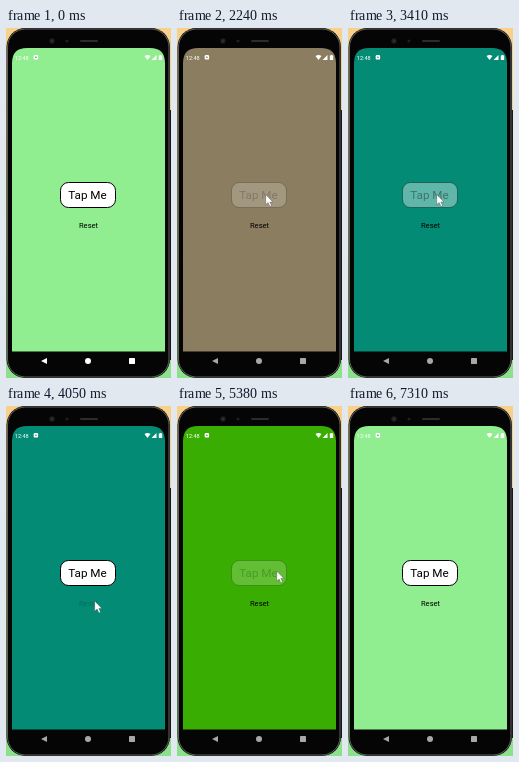
An HTML page that plays this animation: 165 px wide and 350 px high, repeating every 7.63 s.

```html
<!DOCTYPE html>
<html lang="en">
<head>
<meta charset="utf-8">
<title>Tap Me</title>
<style>
  html, body { margin: 0; width: 100%; height: 100%; overflow: hidden; }
  svg { display: block; width: 100vw; height: 100vh; }
  text { font-family: Roboto, sans-serif; }
</style>
</head>
<body>
<svg viewBox="0 0 165 350">
  <defs>
    <linearGradient id="desk" x2="0" y2="1">
      <stop offset="0" stop-color="#f8d08a"/>
      <stop offset=".5" stop-color="#d8d896"/>
      <stop offset="1" stop-color="#8be08b"/>
    </linearGradient>
  </defs>
  <rect width="165" height="350" fill="url(#desk)"/>

  <!-- phone -->
  <rect x="162" y="82" width="3" height="250" fill="#1a1614"/>
  <rect x=".5" y="0" width="163.500" height="350" rx="19" fill="#050505"/>
  <rect x="1.500" y="1" width="161.500" height="348" rx="18" fill="none" stroke="#6c6e6c" stroke-width=".9"/>
  <rect x="74" y="12" width="18" height="2" rx="1" fill="#2c2c2c"/>
  <circle cx="46" cy="13" r="2.7" fill="#1d1f22"/>
  <circle cx="46" cy="13" r="1" fill="#30343a"/>
  <circle cx="61" cy="13" r="1.6" fill="#1d1f22"/>
  <path id="screen" d="M6 323.500V35Q6 20 21 20H144Q159 20 159 35V323.500Z"/>

  <!-- status bar -->
  <g fill="#fff">
    <text x="8.8" y="31.6" font-size="5.6">12:48</text>
    <rect x="27.7" y="27" width="4.4" height="4.6" rx="1.2"/>
    <path d="M138.500 28Q141.500 26 144.500 28L141.500 32ZM150.500 27V32H145.500ZM152.800 27.600H153.700V27H155.300V27.600H156.200V32H152.800Z"/>
  </g>
  <circle cx="29.9" cy="29.3" r=".8" fill="#666"/>

  <!-- app -->
  <g id="tap">
    <rect x="54.500" y="154.500" width="55" height="25" rx="8" fill="#fff" stroke="#000"/>
    <text x="81.500" y="171.200" font-size="11.700" text-anchor="middle">Tap Me</text>
  </g>
  <text id="reset" x="82.500" y="199.700" font-size="7.600" text-anchor="middle">Reset</text>

  <!-- navigation bar -->
  <g id="nav">
    <path d="M41 330V336L35 333Z"/>
    <circle cx="82" cy="333" r="3"/>
    <rect x="123" y="330" width="6" height="6" rx=".4"/>
  </g>

  <path id="cursor" d="M0 0V10.200L2.400 8L4.200 12L5.900 11.200L4.200 7.400H7.200Z"
        fill="#fff" stroke="#333" stroke-width=".35"/>
</svg>

<script>
const LOOP = 7630;
const HOME = '#90ee90';
const el = id => document.getElementById(id);

// [press, release, button, background after release]
const presses = [
  [1450, 1580, 'tap', '#5a88a0'],
  [2140, 2240, 'tap', '#8b7d5f'],
  [2700, 2870, 'tap', '#97388f'],
  [3250, 3330, 'tap', '#038b76'],
  [3950, 4120, 'reset', HOME],
  [4810, 4890, 'tap', '#b0883c'],
  [5240, 5380, 'tap', '#3aad02'],
  [5610, 5690, 'tap', '#4dd5ff'],
  [6240, 6370, 'reset', HOME]
];

// [start, end, x, y]: the pointer reaches x, y at the end
const moves = [
  [440, 440, 118, 323],
  [440, 1150, 88.7, 166.5],
  [3600, 3810, 88.7, 195],
  [4380, 4680, 99.7, 165],
  [5960, 6220, 91.7, 200],
  [6460, 7150, 138, 319],
  [7150, 7230, 138, 339]
];

const ease = p => {
  p = Math.min(1, Math.max(0, p));
  return p < .5 ? 2 * p * p : 1 - 2 * (1 - p) ** 2;
};

function opacity(button, t) {
  const last = presses.filter(([down, , name]) => name === button && t >= down).pop();
  if (!last) return 1;
  const [down, up] = last;
  return t < up ? 1 - .8 * ease((t - down) / 100) : .2 + .8 * ease((t - up) / 250);
}

// Face, border and label fade separately, each over the one below
function fade(button, t) {
  const alpha = opacity(button, t);
  el(button).setAttribute('fill-opacity', alpha);
  el(button).setAttribute('stroke-opacity', alpha);
}

function pointer(t) {
  let x = 0, y = 0;
  for (const [start, end, toX, toY] of moves) {
    if (t < start) break;
    const p = end > start ? ease((t - start) / (end - start)) : 1;
    x += (toX - x) * p;
    y += (toY - y) * p;
  }
  return `translate(${x} ${y})`;
}

function draw(t) {
  const released = presses.filter(([, up]) => t >= up).pop();
  el('screen').setAttribute('fill', released ? released[3] : HOME);
  fade('tap', t);
  fade('reset', t);
  el('nav').setAttribute('fill', t < 130 ? '#fff' : t < 440 ? '#ccc' : '#a8a8a8');
  el('cursor').setAttribute('transform', pointer(t));
  el('cursor').setAttribute('visibility', t >= 440 && t < 7310 ? 'visible' : 'hidden');
}

const began = performance.now();
function tick() {
  draw((performance.now() - began) % LOOP);
  requestAnimationFrame(tick);
}
tick();
</script>
</body>
</html>
```
